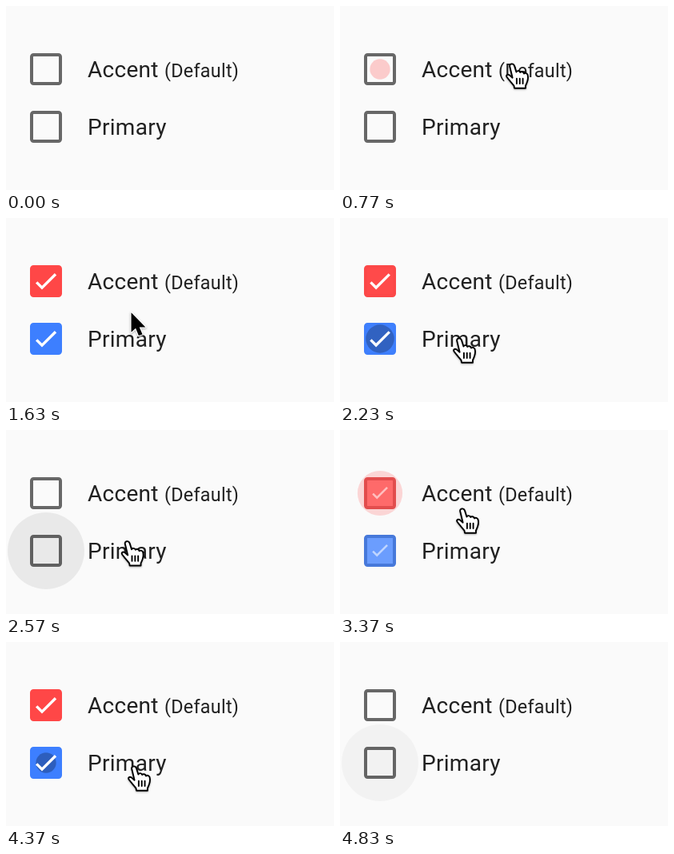
Recreate the animation shown at these times as an HTML page. Size 410 by 230 pixels, loop 5770 ms.

```html
<!DOCTYPE html>
<html lang="en">
<head>
<meta charset="utf-8">
<title>Checkbox themes</title>
<style>
  html, body { margin: 0; width: 100%; height: 100%; overflow: hidden; background: #fafafa; }
  svg { display: block; width: 410px; height: 230px; }
  text { font: 28px Roboto, sans-serif; letter-spacing: .01em; fill: #212121; white-space: pre; }
  .small { font-size: 23.33px; }
  .box { stroke-width: 4; }
  .check { fill: none; stroke: #fff; stroke-width: 3.4; }
  .hand { fill: #fff; stroke: #000; stroke-width: 2; stroke-linejoin: round; stroke-linecap: round; }
  .arrow { fill: #000; stroke: #fff; stroke-width: 3; paint-order: stroke; stroke-linejoin: round; }
  #cursor { filter: drop-shadow(0 1px 1px rgba(0, 0, 0, .3)); }
</style>
</head>
<body>
<svg viewBox="0 0 410 230">
  <g id="rows"></g>
  <text x="102" y="89">Accent <tspan class="small">(Default)</tspan></text>
  <text x="102" y="161">Primary</text>
  <g id="cursor">
    <path class="arrow" transform="translate(.5 1.5) scale(.85)" d="M0 0V29L6.5 23L11 34L16.5 32L12 21.5H21Z"/>
    <g class="hand" transform="translate(-10 -1) scale(.96)">
      <path d="M6.5 5C5.5 1 11 0 12.5 4L15 12C16 10 19 10 20 12.5C21 11 24.5 11.5 25 14C27 12.5 30 14 30 17C31 22 29 26 27 30V33H12.5L12 30C9 26 6 23 3 19C1 16 3.5 14.5 6 16L10 19.5Z"/>
      <path d="M15.5 20.5V27M19.5 20.5V27M23.5 20.5V27"/>
    </g>
  </g>
</svg>
<script>
  const LOOP = 5770, REST = 4830;
  const FADE = 240, TOGGLE_DELAY = 30, RIPPLE = 560, SPREAD = 350;
  const GREY = [103, 103, 103], PAGE = [250, 250, 250];
  const COLORS = [[255, 71, 71], [61, 127, 255]];

  const clicks = [
    { at: 770, row: 0, on: 1 },
    { at: 2200, row: 1, on: 0 },
    { at: 3270, row: 0, on: 1 },
    { at: 4370, row: 1, on: 0 }
  ];

  const entry = { x: 425, y: 118 };
  const moves = [
    { from: 120, to: 470, x: 216, y: 72 },
    { from: 1340, to: 1870, x: 150, y: 150 },
    { from: 2430, to: 2900, x: 154, y: 98 },
    { from: 3560, to: 3900, x: 161, y: 155 },
    { from: 4480, to: 4820, x: 450, y: 132 }
  ];

  document.getElementById('rows').innerHTML = COLORS.map((_, i) => `
    <g transform="translate(50 ${79 + 72 * i})">
      <rect class="box" x="-18" y="-18" width="36" height="36" rx="2.5"/>
      <circle class="ripple"/>
      <path class="check" d="M-11.8 1.4L-5 8.2L12 -8.8"/>
    </g>`).join('');

  const rows = [...document.getElementById('rows').children].map((el, i) => {
    const [box, ripple, check] = el.children;
    return { color: COLORS[i], box, ripple, check };
  });
  const cursor = document.getElementById('cursor');
  const [arrow, hand] = cursor.children;

  const mix = (a, b, p) => a + (b - a) * p;
  const rgb = (a, b, p) => `rgb(${a.map((v, i) => Math.round(mix(v, b[i], p)))})`;
  const span = (t, from, to) => Math.min(1, Math.max(0, (t - from) / (to - from)));
  const easeOut = (p, power) => 1 - (1 - p) ** power;
  const smooth = p => p * p * (3 - 2 * p);

  function set(el, attrs) {
    for (const name in attrs) el.setAttribute(name, attrs[name]);
  }

  function checkedAmount(t) {
    return clicks.reduce((amount, { at, on }) => {
      const start = at + TOGGLE_DELAY;
      return mix(amount, on, easeOut(span(t, start, start + FADE), 4));
    }, 0);
  }

  function drawRipple({ ripple, color }, click, t) {
    const age = t - click.at;
    set(ripple, {
      r: mix(12.5, 48, easeOut(span(age, 0, SPREAD), 1.7)),
      opacity: .26 * (1 - span(age, 0, RIPPLE)) ** 1.25,
      fill: click.on ? rgb(color, color, 0) : '#000'
    });
  }

  function drawRows(t) {
    const p = checkedAmount(t);
    const click = clicks.findLast(c => t >= c.at);
    rows.forEach((row, i) => {
      set(row.box, { fill: rgb(PAGE, row.color, p), stroke: rgb(GREY, row.color, p) });
      set(row.check, { transform: `translate(0 ${-2 * (1 - p)}) scale(${p})`, opacity: p * p });
      if (click && click.row === i) drawRipple(row, click, t);
      else set(row.ripple, { opacity: 0 });
    });
  }

  function cursorAt(t) {
    return moves.reduce((pos, { from, to, x, y }) => {
      const p = span(t, from, to);
      return { x: mix(pos.x, x, easeOut(p, 3)), y: mix(pos.y, y, smooth(p)) };
    }, entry);
  }

  function drawCursor(t) {
    const { x, y } = cursorAt(t);
    const overLabel = x < 292 && (y < 102 || y > 128);
    set(cursor, { transform: `translate(${x} ${y})` });
    set(arrow, { visibility: overLabel ? 'hidden' : 'visible' });
    set(hand, { visibility: overLabel ? 'visible' : 'hidden' });
  }

  const begin = performance.now();
  function frame() {
    const t = Math.min((performance.now() - begin) % LOOP, REST);
    drawRows(t);
    drawCursor(t);
    requestAnimationFrame(frame);
  }
  frame();
</script>
</body>
</html>
```
